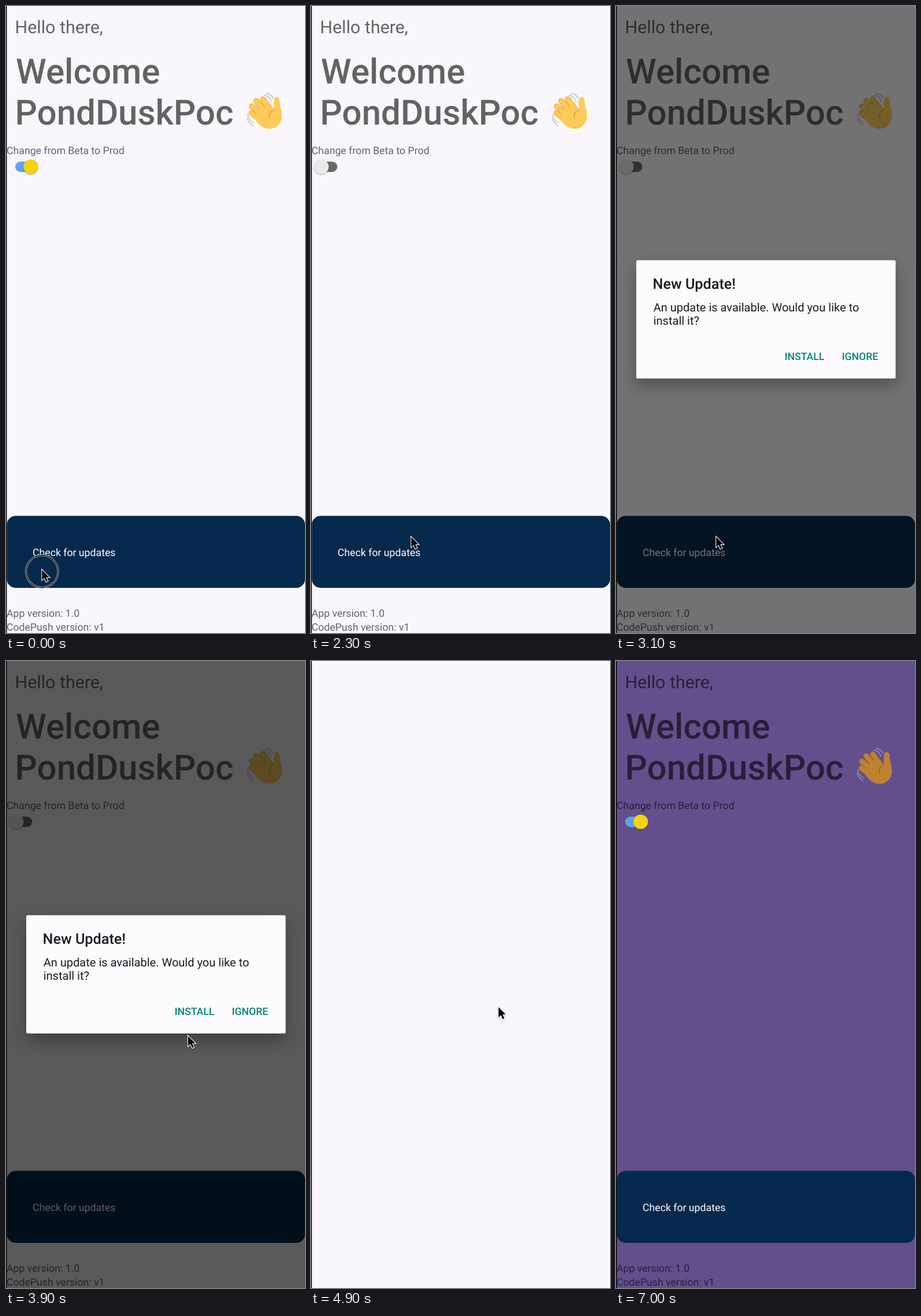
An HTML page that plays this animation: 517 px wide and 1084 px high, repeating every 7.6 s.

```html
<!DOCTYPE html>
<html lang="en">
<head>
<meta charset="utf-8">
<title>Update prompt</title>
<style>
html, body { margin: 0; height: 100%; overflow: hidden; background: #f9f7fb; }
svg { display: block; width: 517px; height: 1084px; font: 17.7px Roboto, sans-serif;
  text-rendering: geometricPrecision; background: var(--bg);
  --bg: #f9f7fb; --hand: #fccb58; --crease: #e0a03c; --wave: #c3c8cd; }
svg.purple { --bg: #634f8b; --hand: #bd8333; --crease: #98642b; --wave: #9485b3; }
.ink { fill: #000; fill-opacity: .6; }
.hello { font-size: 30.4px; }
.big { font-size: 60px; font-weight: 500; }
.title { font-size: 25.2px; font-weight: 500; }
.body { font-size: 20.05px; }
.action { font-weight: 500; fill: #008577; }
.hand path { fill: none; stroke-linecap: round; stroke-linejoin: round; }
.card { filter: drop-shadow(0 12px 14px rgba(0,0,0,.3)); }
.thumb { filter: drop-shadow(0 1px 1px rgba(0,0,0,.35)); }
#cursor { filter: drop-shadow(0 1px 1px rgba(0,0,0,.3)); }
</style>
</head>
<body>
<svg id="stage" viewBox="0 0 517 1084">
  <g id="app">
    <g class="ink">
      <text class="hello" x="15.5" y="47">Hello there,</text>
      <text class="big" x="17" y="134">Welcome</text>
      <text class="big" x="15.5" y="205">PondDuskPoc</text>
      <text x="1" y="256">Change from Beta to Prod</text>
      <text x="1" y="1055.5">App version: 1.0</text>
      <text x="1" y="1080">CodePush version: v1</text>
    </g>
    <g class="hand">
      <g id="fingers"></g>
      <path d="M438 178L452 172 463 180C464 173 461 165 465 159 468 155 473 159 473 164 473 173 478 182 477 193 475 207 464 214 452 212 441 210 435 202 429 194Z" style="fill:var(--hand)"/>
      <path d="M463 180Q453 184 456 194" style="stroke:var(--crease);stroke-width:1.5"/>
      <path d="M446 154Q456 156 458 165M450 151Q460 153 462 160M418 188Q419 197 428 202M417 194Q419 202 427 207" style="stroke:var(--wave);stroke-width:1.8"/>
    </g>
    <rect id="track" x="16" y="269" width="29.5" height="18" rx="9"/>
    <circle id="thumb" class="thumb" cy="278" r="12.6"/>
    <rect x="1.5" y="881.5" width="515.5" height="124.5" rx="15" fill="#04294c"/>
    <text x="46" y="951" fill="#fff">Check for updates</text>
  </g>
  <rect id="dim" width="517" height="1084"/>
  <g id="dialog">
    <rect class="card" x="35" y="439.5" width="448.5" height="204.5" rx="2.5" fill="#fdfbfe"/>
    <g fill="#1d1b1f">
      <text class="title" x="63.5" y="488.5">New Update!</text>
      <text class="body" x="64.7" y="527.5">An update is available. Would you like to</text>
      <text class="body" x="64.7" y="551">install it?</text>
    </g>
    <text class="action" x="291.5" y="612">INSTALL</text>
    <text class="action" x="390.5" y="612">IGNORE</text>
  </g>
  <rect width="1.4" height="1084"/>
  <g id="pointer">
    <g id="ring" fill="none">
      <circle cy="2.5" r="27.8" stroke="#b3aeab" stroke-width="3.2"/>
      <circle cy="2.5" r="27.8" stroke="#1a1a1c" stroke-width="1.5"/>
    </g>
    <path id="cursor" d="M0 0V17.4L4.1 13.7 7.1 20.6 10 19.3 7 12.6H12.4Z" stroke="#fff" stroke-width="2.2" paint-order="stroke"/>
  </g>
</svg>
<script>
const LOOP = 7600, STEP = 100;
const OPEN = 2800, CLOSE = 4600, BLANK = 4900, RELOAD = 5000;
const CLICKS = [0, 1400, 2600, 4500];

const $ = id => document.getElementById(id);
const set = (id, attrs) => {
  for (const k in attrs) $(id).setAttribute(k, attrs[k]);
};
const mix = (a, b, p) => a + (b - a) * p;
const ramp = (t, from, to) => Math.min(1, Math.max(0, (t - from) / (to - from)));
const smooth = p => p * p * (3 - 2 * p);
const easeOut = p => p * (2 - p);

// Four fingers fan out from the knuckle line, the middle ones longest.
for (let i = 0; i < 4; i++) {
  const p = i / 3, angle = mix(3.32, 4.33, p), reach = 32 + 4 * Math.sin(Math.PI * p);
  const tip = `${456 + reach * Math.cos(angle)} ${191 + reach * Math.sin(angle)}`;
  const knuckle = `${mix(444, 460, p)} ${mix(200, 183, p)}`;
  for (const [tone, width] of [['crease', 10], ['hand', 8.4]])
    $('fingers').innerHTML += `<path d="M${tip}L${knuckle}" style="stroke:var(--${tone});stroke-width:${width}"/>`;
}

// Start, up to the switch, down to the button, over to INSTALL.
function pointer(t) {
  const up = smooth(ramp(t, 400, 1100)), down = smooth(ramp(t, 1500, 2200)), over = ramp(t, 3300, 4100);
  return [
    mix(mix(mix(62.3, 36, up), 173.3, down), 324.3, easeOut(over)),
    mix(mix(mix(975, 279, up), 918, down), 598.5, smooth(over))
  ];
}

const press = t => Math.max(...CLICKS.map(c => ramp(t, c - 200, c - 100) - ramp(t, c, c + 200)));

function draw(t) {
  const on = 1 - ramp(t, 1300, 1500) + ramp(t, BLANK, RELOAD);
  const open = t < BLANK;
  $('stage').setAttribute('class', t >= RELOAD ? 'purple' : '');
  set('app', { visibility: open || t >= RELOAD ? 'visible' : 'hidden' });
  set('track', { fill: on > .5 ? '#62a1f9' : '#6b696c' });
  set('thumb', { cx: mix(18, 42.7, on), fill: on > .5 ? '#f3d30b' : '#ebe9eb' });
  set('dim', { opacity: .64 * (smooth(ramp(t, OPEN, OPEN + 400)) - ramp(t, CLOSE, CLOSE + 240)) });
  set('dialog', {
    opacity: ramp(t, OPEN, OPEN + 260) - ramp(t, CLOSE, BLANK),
    transform: `translate(0 ${mix(32, 0, ramp(t, OPEN, OPEN + 200)) - 12 * ramp(t, CLOSE, BLANK)})`
  });
  set('pointer', { opacity: 1 - ramp(t, 6400, 6600), transform: `translate(${pointer(t)})` });
  set('ring', { opacity: press(t) });
}

const start = performance.now();
function tick() {
  const t = (performance.now() - start) % LOOP;
  draw(Math.floor(t / STEP) * STEP);
  requestAnimationFrame(tick);
}
tick();
</script>
</body>
</html>
```
